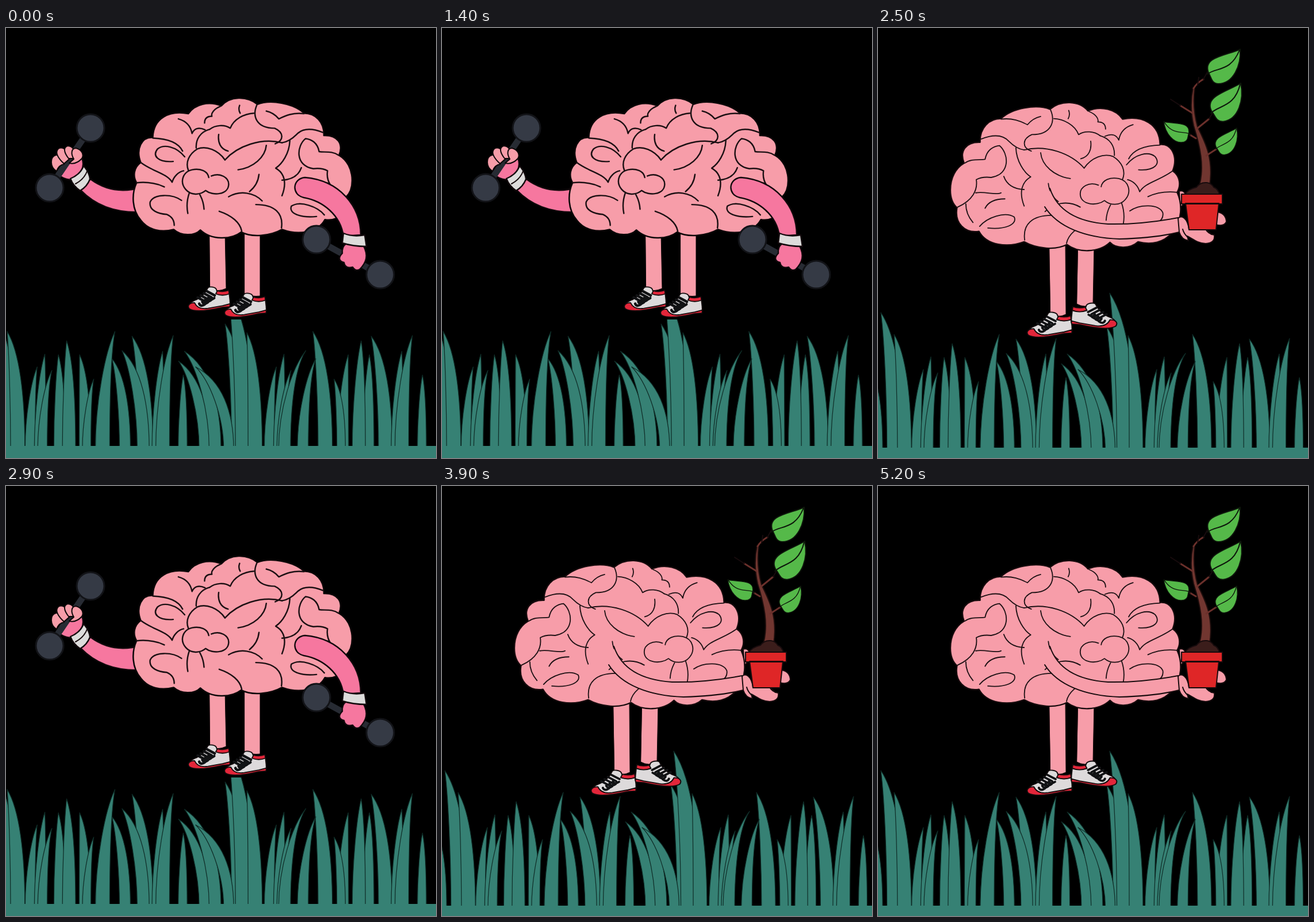
An HTML page for the animation above (5.3 s loop, 748 by 748 pixels).

```html
<!DOCTYPE html>
<html lang="en">
<head>
<meta charset="utf-8">
<title>Busy brain</title>
<style>
html, body { margin: 0; width: 100%; height: 100%; overflow: hidden; background: #000; }
svg { display: block; width: 100vw; height: 100vh; }
svg * { stroke-linecap: round; stroke-linejoin: round; }
.pose { display: none; --skin: #f79da9; --edge: #170b0d; --edge-w: 2.4; --ink: #1c1013; --ink-w: 1.9; --shoe: #dddadb; --lace: #111214; --lace-w: 4; }
.pose.on { display: inline; }
#lift { --ink-w: 2.7; --edge: #0c0708; --edge-w: 2.8; --lace-w: 5; }
#bulb { --edge: #391517; --edge-w: 4.6; --ink: #e6798d; --ink-w: 2.6; --shoe: #fbf4f6; --lace: #8d8488; --lace-w: 1.4; }
.skin { fill: var(--skin); stroke: var(--edge); stroke-width: 2; }
.leg { fill: var(--skin); stroke: var(--edge); stroke-width: 1; }
.arm { fill: #f6779f; stroke: #12090c; stroke-width: 2.4; }
.line { fill: none; stroke: #170b0d; stroke-width: 2; }
.weight { fill: #353a45; stroke: #121317; stroke-width: 3; }
.bar { fill: none; stroke: #272b33; stroke-width: 11; }
.cuff { fill: #dddcdb; stroke: #12090c; stroke-width: 2.4; }
.twig { fill: none; stroke: #6b302b; stroke-width: 3; }
</style>
</head>
<body>
<svg viewBox="0 0 748 748">
<defs>
  <g id="grass" fill="#368174" stroke="#0f2c27" stroke-width="1.2"></g>

  <g id="brain">
    <path fill="var(--skin)" stroke="var(--edge)" stroke-width="var(--edge-w)" d="M156 287C156 264 166 247 181 238C172 216 184 199 210 200C209 174 226 157 248 157C268 138 312 130 337 140C357 123 390 124 406 143C430 133 457 140 469 158C505 151 536 166 537 204C558 202 570 226 560 252C574 262 575 279 568 291C578 313 577 343 560 363C545 383 520 387 497 381C483 394 457 394 446 382C425 402 387 401 368 386C348 397 313 394 290 381C260 392 222 388 208 362C182 366 163 347 168 319C159 311 156 300 156 287Z"/>
    <g fill="none" stroke="var(--ink)" stroke-width="var(--ink-w)">
      <path d="M212 194C235 185 252 187 262 198Q276 212 290 214M248 158C268 155 284 162 296 168Q306 156 320 153M338 141C347 162 340 186 304 186C286 194 286 210 303 216M371 142Q374 150 370 157M344 157C362 158 382 168 389 186C400 178 418 180 428 188M408 144C420 149 426 157 424 163Q438 163 438 176M437 189C450 183 458 187 462 196Q466 174 488 168M411 198C413 213 408 226 393 230"/>
      <path d="M428 188C446 193 455 207 454 224M399 247C412 228 435 219 452 226C468 236 475 252 469 267M430 281C432 268 447 263 462 266C480 270 486 290 474 304C464 316 446 315 436 306C422 317 393 314 392 295C391 281 408 271 425 278M480 230C488 214 508 206 537 205M476 241C492 221 516 216 528 226C538 239 528 252 498 250M478 268C488 270 497 279 500 290C510 273 536 270 560 252M568 291Q538 288 515 299"/>
      <path d="M482 325C500 312 535 312 542 328C545 345 525 351 510 352Q496 358 496 373M182 238C194 229 210 233 219 231C222 214 234 207 245 206C262 220 266 258 230 264Q214 262 203 268C206 287 196 306 169 318M253 262C258 276 270 285 290 286M202 292C220 289 238 297 248 292M184 312C184 328 190 338 197 346M219 320C225 308 238 303 255 303M209 353C222 337 255 325 272 336C278 350 255 359 224 356"/>
      <path d="M291 378C287 350 304 333 340 333M367 384C370 368 386 354 410 346M328 326C343 310 370 305 392 318M275 210C276 235 290 255 302 263C286 272 280 290 290 316M290 214C330 204 375 220 399 247M320 219C322 242 345 262 374 266M334 275Q336 295 352 308M439 342C440 326 444 320 447 314M470 350Q474 330 467 310"/>
    </g>
  </g>

  <g id="shoe" stroke="#120a0b" stroke-width="2">
    <path fill="var(--shoe)" d="M3 12C3 22 0 30 2 38L16 40 42 46C60 50 76 46 80 40C82 33 74 29 66 26C56 21 48 12 44 3C40 0 30 2 28 6L26 12Q14 16 4 10Z"/>
    <path fill="#e3263a" d="M4 8Q14 12 26 9L29 15Q16 20 3 15ZM1 34L16 38 44 43C57 45 66 41 70 32C80 32 85 38 80 44C70 50 50 49 16 41L2 40Z"/>
    <path id="laces" fill="none" stroke="var(--lace)" stroke-width="var(--lace-w)"/>
  </g>

  <g id="leaf" stroke="#0d160b" stroke-width="2">
    <path fill="#55b949" d="M0 0C2 28-12 60-38 60C-51 59-50 48-55 41C-66 13-24 11 0 0Z"/>
    <path fill="none" d="M-57 43C-40 31-16 39-1 1"/>
  </g>
</defs>

<g id="lift" class="pose">
  <use href="#grass" transform="matrix(1.0247 0 0 1.01 -26.7 -10.4)"/>
  <path d="M372 440H432V507H372Z"/>
  <path class="leg" d="M354 355H381L383 453Q368 460 355 454ZM415 355H442V466Q428 468 415 462Z"/>
  <use href="#shoe" transform="translate(391 449) scale(-.9 .9)"/>
  <use href="#shoe" transform="translate(454 460) scale(-.9 .9)"/>
  <path class="arm" d="M236 277C200 288 170 280 147 263L130 282C155 308 190 322 236 320Z"/>
  <use href="#brain" transform="matrix(-.91 0 0 .903 744 6.4)"/>
  <path class="arm" d="M96 240C104 228 120 222 132 226C138 242 130 258 112 264Q96 262 88 252Z"/>
  <path class="bar" d="M76 278L147 174"/>
  <g class="skin">
    <path d="M88 249C76 242 76 224 87 221C97 220 104 229 101 237Q92 238 88 249Z"/>
    <path d="M101 236C92 228 84 217 91 210C101 204 110 218 110 228Z"/>
    <path d="M109 227C101 217 99 208 107 205C117 205 122 216 119 227Z"/>
    <path d="M118 228C112 218 114 209 122 209C132 212 136 220 132 227Q122 238 110 235Z"/>
  </g>
  <path class="cuff" d="M112 262Q129 255 135 240Q145 251 146 263Q141 276 129 283Q117 275 112 262Z"/>
  <path class="line" d="M121 271Q136 263 141 249"/>
  <circle class="weight" cx="76" cy="278" r="24"/>
  <circle class="weight" cx="147" cy="174" r="24"/>
  <path class="arm" d="M520 260C498 262 496 290 518 295C552 301 582 326 587 362L617 360C617 310 580 265 520 260Z"/>
  <path class="bar" d="M540 368L651 429"/>
  <circle class="weight" cx="540" cy="368" r="24"/>
  <circle class="weight" cx="651" cy="429" r="24"/>
  <path class="arm" d="M592 375L622 379C630 395 628 407 615 420Q608 424 603 416Q590 419 588 408C577 405 579 398 585 392Q584 380 592 375Z"/>
  <path class="cuff" d="M587 357Q604 364 624 360L627 380Q604 380 585 374Z"/>
</g>

<g id="bulb" class="pose">
  <use href="#grass"/>
  <path d="M386 455H412V545H386Z"/>
  <path class="leg" d="M338 455H361L359 548H337ZM390 455H411L410 540H388Z"/>
  <use href="#shoe" transform="translate(329 543) scale(.76)"/>
  <use href="#shoe" transform="translate(380 533) scale(.76)"/>
  <path class="skin" d="M369 205H388V270H365Z"/>
  <path fill="#ee8292" d="M370 210H377Q373 240 374 265H367Z"/>
  <g transform="matrix(.753 0 0 .755 88.3 164.4)">
    <use href="#brain"/>
    <path fill="#ed7c8c" opacity=".5" d="M159 287C159 264 169 249 185 238C176 216 187 202 213 202C240 200 244 225 238 265Q240 300 262 330C280 350 272 370 288 381C260 389 224 386 210 360C184 363 166 345 171 318Q160 305 159 287Z"/>
    <path fill="none" stroke="#fcc0c8" stroke-width="3" d="M250 168Q275 160 295 174M350 165Q378 170 390 190Q400 184 412 186M440 160Q458 160 462 168M490 168Q515 172 526 193M540 214Q556 220 553 240"/>
  </g>
  <path class="skin" d="M408 160C416 148 433 146 432 158C428 170 420 175 410 177Z"/>
  <path class="line" d="M412 166L424 153"/>
  <g stroke="#391517" stroke-width="2">
    <path fill="#fdbb35" d="M413 177C392 152 391 138 391 108A80 80 0 1 0 303 191C335 192 352 196 371 213Z"/>
    <path fill="#f8a72c" stroke="none" d="M234 135C258 182 306 174 335 178Q362 182 380 204L371 211C352 194 335 191 303 190C268 188 244 165 234 135Z"/>
    <path fill="#fee1a3" stroke="none" d="M268 50C310 28 368 48 383 91C360 63 325 46 268 50Z"/>
    <path fill="none" d="M321 139L336 123M323 146L381 203M346 124L401 182M341 111l7 7-7 7-7-7ZM316 137l7 7-7 7-7-7Z"/>
    <path fill="#77777d" d="M411 176L438 203Q443 210 439 221L434 235Q424 244 412 243L405 238 373 213Z"/>
    <path fill="#97979d" stroke="none" d="M422 191L438 206Q441 212 437 220L415 234 408 230Z"/>
    <path fill="none" d="M418 184L380 220M425 191L388 226M433 198L397 233"/>
  </g>
  <path fill="var(--skin)" d="M287 198C305 236 316 285 315 376Q325 390 338 362C338 300 324 232 299 192Z"/>
  <path class="line" d="M287 198C305 236 316 285 315 378M299 195C324 232 338 300 338 361"/>
  <path class="skin" d="M240 176C242 167 260 183 275 188L294 192C299 198 292 203 278 201C255 197 241 189 240 176Z"/>
  <path class="line" d="M248 179Q263 194 288 196"/>
</g>

<g id="write" class="pose">
  <path class="leg" d="M333 385H361L360 508H331ZM401 388H429L427 497H399Z"/>
  <use href="#shoe" transform="translate(388 490)"/>
  <use href="#shoe" transform="translate(320 502)"/>
  <use href="#brain"/>
  <g transform="translate(331 219) rotate(48.7)" stroke="#170b0d" stroke-width="2">
    <path fill="#f3545f" d="M22-26H0A26 26 0 0 0 0 26H22Z"/>
    <path fill="#f6881f" d="M46-26H294V26H46Z"/>
    <path fill="#191718" d="M21-26H47V26H21Z"/>
    <path fill="#fdb933" stroke="none" d="M32-23H37V23H32Z"/>
    <path fill="#df9868" d="M294-26C280-25 276-2 288 0C274 4 278 25 294 26L340 0Z"/>
    <path fill="#39191a" d="M319-12Q314 0 319 12L340 0Z"/>
  </g>
  <path fill="#f587a4" d="M292 263C272 310 268 352 288 372C310 388 360 380 393 363Q412 367 432 363Q439 357 434 350L425 348Q437 348 438 341C443 332 440 325 432 325C433 315 420 312 416 317C412 307 398 311 392 323L384 338C370 345 345 349 322 346C299 340 300 323 314 291Z"/>
  <path class="line" d="M292 264C272 310 268 352 288 372C310 388 360 380 393 363Q412 367 432 363Q439 357 434 350L421 347M425 341Q437 342 440 333C440 325 432 323 425 326M432 325C433 315 420 312 413 317C408 307 396 313 392 322L384 338C370 345 345 349 322 346C299 340 300 323 314 292M385 358L392 363M425 341Q439 343 434 350"/>
  <use href="#grass"/>
</g>

<g id="plant" class="pose">
  <use href="#grass"/>
  <path class="leg" d="M298 375H326L327 498Q313 505 300 498ZM348 378H376L374 480Q360 488 346 480Z"/>
  <use href="#shoe" transform="translate(339 493) scale(-.97 .94)"/>
  <use href="#shoe" transform="translate(335 477) scale(.98 .95)"/>
  <path class="skin" d="M524 284Q535 280 538 300L526 312ZM590 320Q605 322 606 337Q602 346 588 342Z"/>
  <use href="#brain" transform="matrix(.957 0 0 .956 -23.3 7.6)"/>
  <path fill="var(--skin)" d="M301 279C310 312 340 337 400 341C450 342 490 336 524 328L526 355C500 360 460 366 420 367C360 365 312 346 290 311Z"/>
  <path class="line" d="M299 279C310 312 340 337 400 341C450 342 490 336 522 330M290 311C312 346 360 365 420 367C460 366 500 361 524 355"/>
  <path class="skin" d="M522 331C528 325 538 330 541 350L570 350Q574 358 585 360Q587 374 570 375C555 374 548 367 538 362L540 370Q528 368 524 355Z"/>
  <path class="line" d="M530 350Q532 358 539 364M572 352L580 359"/>
  <path fill="#713630" stroke="#1d0d0c" stroke-width="2" d="M559 274C568 240 560 205 549 170C542 140 545 118 548 104L551 106C548 130 550 150 556 172C570 200 584 228 577 274Z"/>
  <path class="twig" d="M549 105Q554 96 566 89M547 148L526 135M555 175L576 158M553 192L543 186M571 222L588 211"/>
  <path class="line" d="M526 135L509 124M566 89L574 75M576 158L584 144M556 99L558 86M543 186L534 181"/>
  <use href="#leaf" transform="translate(630 37)"/>
  <use href="#leaf" transform="translate(631 96) rotate(-8) scale(1.03)"/>
  <use href="#leaf" transform="translate(624 174) rotate(-8) scale(.72)"/>
  <use href="#leaf" transform="translate(497 163) rotate(-12) scale(-.7 .7)"/>
  <path fill="#3b1d1b" stroke="#170b0d" stroke-width="2" d="M533 290Q540 280 554 277Q560 268 572 269Q580 270 584 277Q592 280 594 290Z"/>
  <path fill="#df2627" stroke="#170b0d" stroke-width="2" d="M535 305H593L588 351H541ZM528 289H599V306H528Z"/>
</g>
</svg>
<script>
const GROUND = 735, SHIFT = 406, MIRROR = 758;

// A blade from its tip; lean is how far the foot lies to the right.
function blade([x, y, lean]) {
  const h = GROUND - y, half = h * .06, foot = x + lean;
  const a = foot - half, b = foot + half;
  return `M${a} ${GROUND}C${a} ${GROUND - h * .4} ${x + (a - x) * .5} ${y + h * .17} ${x} ${y}` +
    `C${x + (b - x) * .7} ${y + h * .17} ${b} ${GROUND - h * .45} ${b} ${GROUND}Z`;
}

// Two clumps recur further right: one shifted, one mirrored.
const tall = [[-10, 600, 10], [5, 495, 25], [28, 533, 18], [398, 520, 24], [403, 461, 29], [435, 535, 14]];
const shifted = [[79, 594, -12], [92, 572, -8], [104, 600, -16], [240, 541, 24], [292, 567, -8], [310, 540, -18], [327, 608, -1]];
const mirrored = [[115, 573, 2], [129, 549, 4], [151, 573, 9], [175, 615, -12], [211, 533, -21], [206, 580, 22], [223, 566, 36]];
const drooping = [[319, 584, 44], [329, 567, 52], [348, 594, 56]];
const blades = [
  ...tall, ...shifted, ...mirrored, ...drooping,
  ...shifted.map(([x, y, lean]) => [x + SHIFT, y, lean]),
  ...mirrored.map(([x, y, lean]) => [MIRROR - x, y, -lean])
];
document.getElementById("grass").innerHTML =
  blades.map(b => `<path d="${blade(b)}"/>`).join("") +
  '<path stroke="none" d="M-20 730H780V760H-20Z"/>';

document.getElementById("laces").setAttribute("d", [0, 1, 2, 3].map(i =>
  `M${31 + i * 6} ${18 + i * 4}l15-8m-14 13q8 6 11-1`).join(""));

// Poses change at 10/3 ticks each, snapped to whole ticks.
const LOOP = 5300, TICK = 100, RATE = .3;
const poses = ["lift", "bulb", "write", "plant"].map(id => document.getElementById(id));
const start = performance.now();
function draw() {
  const tick = Math.floor(((performance.now() - start) % LOOP) / TICK);
  const now = Math.floor((tick + .5) * RATE) % poses.length;
  poses.forEach((pose, i) => pose.classList.toggle("on", i === now));
  requestAnimationFrame(draw);
}
draw();
</script>
</body>
</html>
```
